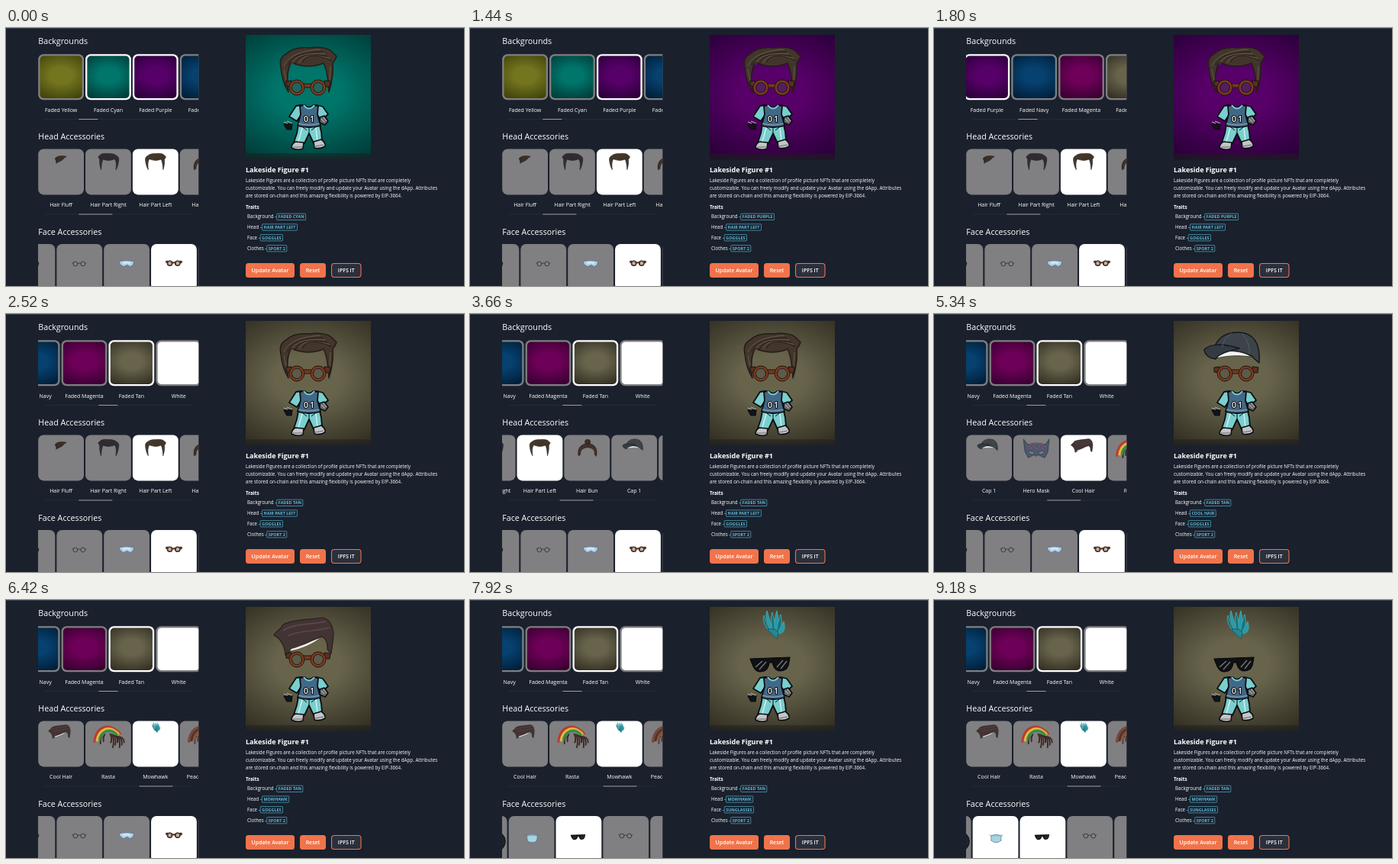
Write an HTML page with a canvas that moves like this. It is 600x338 px and loops after 9240 ms.

```html
<!DOCTYPE html>
<html lang="en">
<head>
<meta charset="utf-8">
<title>Avatar editor</title>
<style>
html, body { margin: 0; width: 100%; height: 100%; overflow: hidden; background: #1a202c; }
canvas { display: block; width: 100vw; height: 100vh; }
</style>
</head>
<body>
<canvas id="stage"></canvas>
<script>
const W = 600, H = 338, LOOP = 9240, STEP = 60;
const PITCH = 61.85, CARD = 59.8, LEFT = 42.2, RIGHT = 252.3;
const FONT = '"Open Sans", "Noto Sans", sans-serif';
const INK = '#0d0d10', ACCENT = '#f1734b', TEXT = '#ffffff', GREY = '#807f81';
const canvas = document.getElementById('stage');
const c = canvas.getContext('2d');

// ---- drawing helpers
function shape(d, fill, stroke, width = 1) {
  const p = new Path2D(d);
  if (fill) { c.fillStyle = fill; c.fill(p); }
  if (stroke) { c.strokeStyle = stroke; c.lineWidth = width; c.stroke(p); }
}
function disc(x, y, rx, ry, fill, stroke, width = 1) {
  c.beginPath();
  c.ellipse(x, y, rx, ry, 0, 0, Math.PI * 2);
  if (fill) { c.fillStyle = fill; c.fill(); }
  if (stroke) { c.strokeStyle = stroke; c.lineWidth = width; c.stroke(); }
}
function box(x, y, w, h, r, fill, stroke, width = 1) {
  c.beginPath();
  c.roundRect(x, y, w, h, r);
  if (fill) { c.fillStyle = fill; c.fill(); }
  if (stroke) { c.strokeStyle = stroke; c.lineWidth = width; c.stroke(); }
}
function text(s, x, y, size, weight = 400, color = TEXT, align = 'left') {
  c.font = `${weight} ${size}px ${FONT}`;
  c.textAlign = align;
  c.fillStyle = color;
  c.fillText(s, x, y);
  return c.measureText(s).width;
}
// wide elliptical glow that darkens towards the corners
function vignette(x, y, w, h, r, [inner, outer]) {
  c.save();
  c.beginPath();
  c.roundRect(x, y, w, h, r);
  c.clip();
  c.translate(x + w / 2, y + h * .46);
  c.scale(w * .85, h * .62);
  const g = c.createRadialGradient(0, 0, 0, 0, 0, 1);
  g.addColorStop(.3, inner);
  g.addColorStop(1, outer);
  c.fillStyle = g;
  c.fillRect(-1, -1, 2, 2);
  c.restore();
}

// ---- wearable art, in the coordinates of the large portrait
function partedHair(fill, strand, edge) {
  shape('M360 52C358 43 361 37 367 34C374 27 386 25 398 26C410 24 422 26 427 31L433 37C432 41 430 43 428 46C429 56 428 68 423 84C422 70 421 56 416 46C402 52 386 51 374 45C368 53 368 68 370 84C365 76 361 63 360 52Z', fill, edge, 1.5);
  for (let i = 0; i < 6; i++)
    shape(`M${364 + i * 5} ${50 - i}C${368 + i * 5} ${38 - i} ${384 + i * 5} ${30 + i} ${412 + i * 3} ${28 + i * 3}`, null, i % 2 ? edge : strand, 1);
  shape('M364 54L367 68M425 50L424 68', null, strand, .9);
}
function mirror(draw) {
  c.save();
  c.translate(793, 0);
  c.scale(-1, 1);
  draw();
  c.restore();
}
function dreads(bands, tail) {
  for (let i = 0; i < 7; i++)
    shape(`M${402 + i * 6} ${54 + i * 2}Q${412 + i * 7} 72 ${404 + i * 8} ${88 + (i * 5) % 3 * 9}`, null, tail, 5);
  shape('M384 56Q376 68 379 84M374 62Q366 74 368 92', null, tail, 5);
  bands.forEach((col, i) =>
    shape(`M${346 + i * 9} ${86 - i * 4}C${352 + i * 9} ${30 + i * 8} ${396 + i * 3} ${10 + i * 10} ${440 - i * 6} ${56 + i * 2}`, null, col, 9));
}
const art = {
  fluff() {
    shape('M374 44C380 34 398 32 415 36C409 40 405 43 402 47C396 53 386 55 378 61C380 55 377 50 374 44Z', '#322823', '#1c1716', 1.2);
    shape('M380 46C388 39 398 38 408 38M382 52Q391 47 399 44', null, '#66554a', 1.2);
  },
  right() { mirror(() => partedHair('#2e2c31', '#4c484f', '#1d1b20')); },
  left() { partedHair('#42362c', '#6b5a49', '#241c18'); },
  bun() {
    disc(398, 34, 10, 9, '#3d2e27', '#251c18', 1.3);
    shape('M365 84C360 58 374 40 398 40C424 40 436 60 429 86L423 80C425 66 418 56 398 54C378 56 371 66 372 80Z', '#3d2e27', '#251c18', 1.3);
    shape('M370 66Q380 49 395 46M425 66Q417 50 402 46', null, '#69513f');
  },
  cap() {
    shape('M367 52C366 36 378 24 398 24C419 24 428 39 426 64C422 61 419 58 416 55C400 47 382 47 367 52Z', '#3c4349', '#15181c', 1.5);
    shape('M367 53C383 46 404 48 416 56C405 55 390 53 370 58Z', '#f4f4f2', '#23272b', .8);
    shape('M354 47C360 39 378 38 400 45C389 48 374 51 369 59C361 58 355 54 354 47Z', '#343b42', '#15181c', 1.4);
    shape('M390 25C382 31 378 37 378 43M403 25C411 33 414 44 413 52', null, '#59626a', .9);
  },
  hero() {
    shape('M350 24L366 44Q396 32 428 44L442 24L437 70L426 91L403 80L396 86L388 80L367 91L355 68Z', '#4b5a70', '#262d3b', 1.8);
    shape('M369 66L390 72L383 78L370 74ZM423 66L402 72L409 78L422 74Z', '#878488', '#202633', 1.2);
    for (let i = 0; i < 7; i++) disc(367 + i * 10, 50 + (i % 2) * 7, 2.4, 2.4, '#ad4a70');
    shape('M372 44Q396 35 422 44', null, '#a5485e', 3);
  },
  cool() {
    shape('M351 46C354 39 361 39 363 32C377 25 400 26 414 23C423 24 428 33 429 44C429 52 427 62 426 70L421 65C421 56 420 51 414 48C398 53 385 61 372 68L366 72C365 62 362 52 351 46Z', '#423433', '#292120', 1.2);
    shape('M372 67L374 64C387 61 399 54 411 50Q397 61 372 67Z', '#f3f1ee');
    shape('M363 40C378 30 399 33 419 28M369 47C385 39 403 42 424 36', null, '#624657', 1.5);
  },
  rasta() { dreads(['#bc3b32', '#dfbd3b', '#398b48'], '#38261f'); },
  mohawk() {
    const tips = [[385, 20], [389, 14], [396, 16], [402, 14], [407, 19], [411, 28]];
    tips.forEach(([x, y], i) => {
      const base = 394 + i * 1.8;
      shape(`M${base} 43Q${x - 4} ${y + 9} ${x} ${y}Q${x + 4} ${y + 14} ${base + 3} 44Z`, i % 2 ? '#2a98a3' : '#187485', '#46adb4', .8);
    });
    shape('M390 39Q397 35 404 42L402 51L396 45Z', '#218895', '#125361', .8);
  },
  braids() { dreads(['#76483a', '#543329', '#88513b'], '#5a372b'); },

  helmet() { disc(396, 100, 75, 48, '#202227', '#111216', 3); },
  mask() {
    shape('M374 76L382 81M422 76L414 81M378 96L384 94M418 96L412 94', null, '#515962', 1.5);
    shape('M379 79Q398 72 417 79L415 98Q398 110 381 98Z', '#8fc7d9', '#4c7183', 1.5);
    shape('M382 85H414M383 91H413M385 97H411', null, '#e1f2f5', 1.7);
  },
  shades() {
    shape('M367 77L419 75L418 81C417 90 412 93 406 93C400 93 398 88 396 82L392 82C391 90 387 94 380 94C374 94 371 88 369 82Z', '#101114', '#08080a', 1.2);
    shape('M374 88L383 80M379 91L388 81M402 88L410 79M407 90L415 80', null, '#777a78', 1.3);
  },
  round() {
    disc(381, 80, 8, 8, null, '#1d1b1e', 1.8);
    disc(408, 80, 8, 8, null, '#1d1b1e', 1.8);
    shape('M389 79Q394.5 75 400 79M373 78L369 76M416 78L420 76', null, '#1d1b1e', 1.8);
  },
  snorkel() {
    shape('M368 71L376 70Q396 66 414 70L422 71L419 83L409 90L397 84L385 90L373 83Z', '#a9d1e8', '#56687c', 2);
    shape('M378 74Q395 70 411 74L407 82L397 78L385 82Z', '#d1e8f2');
  },
  goggles() {
    shape('M367 70L374 69L373 77L367 76ZM417 69L425 70L424 77L417 77Z', '#57311f', '#20140f', 1.1);
    shape('M387 73H403V78H387Z', '#713a1e', '#25150f', 1);
    for (const x of [381, 409]) {
      disc(x, 78, 6.5, 6.5, 'rgba(75,78,74,.4)');
      disc(x, 78, 8.3, 8.3, null, '#24140e', 4.2);
      disc(x, 78, 8.3, 8.3, null, '#7c3d20', 2.5);
    }
  },
  blank() {}
};

function outfit() {
  c.lineJoin = 'round';
  const aqua = '#79cfcf';
  shape('M383 127H411L413 136L414 147L403 151L397 138L391 151L377 150L381 138Z', aqua, INK, 1.8);
  shape('M388 131L383 149M406 131L408 148', null, '#d7f0ed', 1.4);
  shape('M397 128V138M389 130L394 134M405 130L400 134', null, INK, 1);
  shape('M379 149L390 150L389 158Q382 161 374 157Q374 152 379 149ZM403 149L413 146Q419 150 418 155Q411 159 404 157Z', '#c3c5c8', INK, 1.6);
  shape('M376 156L388 156M405 155L416 153', null, '#66696e', 1.2);
  shape('M380 102L387 101L387 113L381 122L371 116ZM407 101L415 103L422 113L413 121L407 113Z', aqua, INK, 1.8);
  shape('M385 102L391 101Q397 107 403 101L409 102L408 113L412 128Q397 132 382 128L386 113Z', '#426887', INK, 1.8);
  shape('M390 101Q397 110 404 101', null, aqua, 2);
  shape('M383 125Q397 129 411 125', null, '#8badbf', 1);
  c.lineWidth = 2.2;
  c.strokeStyle = INK;
  c.font = `600 10.5px ${FONT}`;
  c.textAlign = 'center';
  [['0', 393], ['1', 401]].forEach(([digit, x]) => {
    c.strokeText(digit, x, 122.5);
    c.fillStyle = '#f6f6f4';
    c.fillText(digit, x, 122.5);
  });
  shape('M364 126L375 125L374 133L368 133Z', '#131417', INK, 1.2);
  shape('M364 123L369 125M368 122L375 125', null, '#a6abab', 1.2);
  shape('M411 117L417 115L422 122L418 127L411 124Z', '#666b70', INK, 1.6);
  shape('M413 119L417 123M416 117L420 122', null, '#c6c9c9', 1);
}

// ---- content
const backdrops = [
  ['Faded Yellow', '#74761f', '#3f4209'],
  ['Faded Cyan', '#00756a', '#003a37'],
  ['Faded Purple', '#580069', '#280037'],
  ['Faded Navy', '#06416f', '#001d37'],
  ['Faded Magenta', '#6f005a', '#36002f'],
  ['Faded Tan', '#68644c', '#312e22'],
  ['White', '#ffffff', '#ffffff']
];
const heads = [
  ['Hair Fluff', 'fluff'], ['Hair Part Right', 'right'], ['Hair Part Left', 'left'],
  ['Hair Bun', 'bun'], ['Cap 1', 'cap'], ['Hero Mask', 'hero'], ['Cool Hair', 'cool'],
  ['Rasta', 'rasta'], ['Mowhawk', 'mohawk'], ['Peace Braids', 'braids']
];
const faces = [
  ['Helmet', 'helmet'], ['Mask', 'mask'], ['Sunglasses', 'shades'], ['Glasses', 'round'],
  ['Snorkel', 'snorkel'], ['Goggles', 'goggles'], ['None', 'blank']
];

// ---- timing: clicks select at once, the portrait follows after LAG
const LAG = 110;
const picks = {
  backdrop: [[0, 1], [300, 2], [2340, 5]],
  head: [[0, 2], [4440, 4], [5340, 6], [6420, 8]],
  face: [[0, 5], [7380, 2]]
};
const hovers = {
  backdrop: [[0, 2], [1000, -1], [2040, 5], [2760, -1]],
  head: [[0, -1], [3900, 4], [4680, -1], [5160, 6], [5580, -1], [6180, 8], [6480, -1]],
  face: [[0, -1], [6720, 1], [7080, 2], [8760, 1]]
};
function at(t, keys) {
  let value = keys[0][1];
  for (const [time, v] of keys) if (t >= time) value = v;
  return value;
}
function ease(t, from, to) {
  const k = Math.min(1, Math.max(0, (t - from) / (to - from)));
  return k * k * (3 - 2 * k);
}

// ---- page sections
function row(t, key, items, top, scroll) {
  const chosen = at(t, picks[key]), hover = at(t, hovers[key]);
  c.save();
  c.beginPath();
  c.rect(42, top - 1, RIGHT - 42, 90);
  c.clip();
  items.forEach((item, i) => {
    const x = LEFT + i * PITCH - scroll;
    if (x > RIGHT || x + CARD < 40) return;
    const tone = i === chosen || i === hover ? '#ffffff' : GREY;
    box(x, top, CARD, 60, 7, tone);
    if (key === 'backdrop') {
      vignette(x + 2.3, top + 2.3, CARD - 4.6, 55.4, 5, item.slice(1));
    } else {
      c.save();
      c.beginPath();
      c.rect(x, top, CARD, 60);
      c.clip();
      c.translate(x, top);
      c.scale(.366, .366);
      c.translate(-314, -9);
      art[item[1]]();
      c.restore();
    }
    text(item[0], x + CARD / 2, top + 75.8, 7, 400, TEXT, 'center');
  });
  c.restore();
}
function scrollbar(x, y, w) {
  c.fillStyle = 'rgba(255,255,255,.05)';
  c.fillRect(50, y, 195, 1);
  c.fillStyle = '#9a9ca1';
  c.fillRect(x, y, w, 1);
}
function portrait(t) {
  const shown = t - LAG;
  vignette(314, 9, 164, 164, 0, backdrops[at(shown, picks.backdrop)].slice(1));
  const floor = c.createLinearGradient(0, 164, 0, 173);
  floor.addColorStop(0, 'rgba(28,29,33,.45)');
  floor.addColorStop(1, 'rgba(28,29,33,.8)');
  c.fillStyle = floor;
  c.fillRect(314, 164, 164, 9);
  outfit();
  art[heads[at(shown, picks.head)][1]]();
  art[faces[at(shown, picks.face)][1]]();
}
function trait(label, value, y) {
  const x = 316 + text(label + ' -', 316, y, 6.2) + .6;
  c.font = `700 5.45px ${FONT}`;
  const w = c.measureText(value.toUpperCase()).width + 4;
  box(x, y - 6.1, w, 8.3, .6, null, '#4c9db9', .8);
  text(value.toUpperCase(), x + 2, y + .1, 5.45, 700, '#61b8d7');
}
function button(label, x, w, outlined) {
  if (outlined) box(x + .5, 308.5, w - 1, 18, 3.5, '#2a303c', ACCENT, 1.1);
  else box(x, 308, w, 19, 3.5, ACCENT);
  text(label, x + w / 2, 320.2, 7, 600, '#fff', 'center');
}
function details(t) {
  text('Lakeside Figure #1', 314, 189.4, 9, 700);
  [
    'Lakeside Figures are a collection of profile picture NFTs that are completely',
    'customizable. You can freely modify and update your Avatar using the dApp. Attributes',
    'are stored on-chain and this amazing flexibility is powered by EIP-3664.'
  ].forEach((line, i) => text(line, 314, 202.3 + i * 9.8, 6.22));
  text('Traits', 314, 237, 6.3, 700);
  trait('Background', backdrops[at(t, picks.backdrop)][0], 249.3);
  trait('Head', heads[at(t, picks.head)][0], 263);
  trait('Face', faces[at(t, picks.face)][0], 276.7);
  trait('Clothes', 'Sport 2', 290.7);
  button('Update Avatar', 314, 64);
  button('Reset', 385, 34);
  button('IPFS IT', 426, 39.5, true);
}

function draw(t) {
  c.setTransform(canvas.width / W, 0, 0, canvas.height / H, 0, 0);
  c.textBaseline = 'alphabetic';
  c.fillStyle = '#1a202c';
  c.fillRect(0, 0, W, H);
  c.fillStyle = '#3b414b';
  c.fillRect(0, 0, W, 1);
  const backScroll = 217 * ease(t, 1500, 2040);
  const headScroll = 2 * PITCH * (ease(t, 3300, 3780) + ease(t, 4740, 5160) + ease(t, 5700, 6180));
  const faceScroll = 161.4 - 108 * ease(t, 6450, 6750);
  text('Backgrounds', 42.3, 21, 10.7);
  text('Head Accessories', 42.3, 146, 10.7);
  text('Face Accessories', 42.3, 270.6, 10.7);
  row(t, 'backdrop', backdrops, 34.2, backScroll);
  row(t, 'head', heads, 158.4, headScroll);
  row(t, 'face', faces, 283, faceScroll);
  scrollbar(95.3 + backScroll * .12, 119, 25);
  scrollbar(95.3 + headScroll * .2135, 243.5, 44);
  portrait(t);
  details(t);
}

function resize() {
  const ratio = window.devicePixelRatio || 1;
  canvas.width = Math.round(innerWidth * ratio);
  canvas.height = Math.round(innerHeight * ratio);
}
const start = performance.now();
function tick() {
  const t = (performance.now() - start) % LOOP;
  draw(Math.floor(t / STEP) * STEP);
  requestAnimationFrame(tick);
}
addEventListener('resize', resize);
resize();
tick();
</script>
</body>
</html>
```
